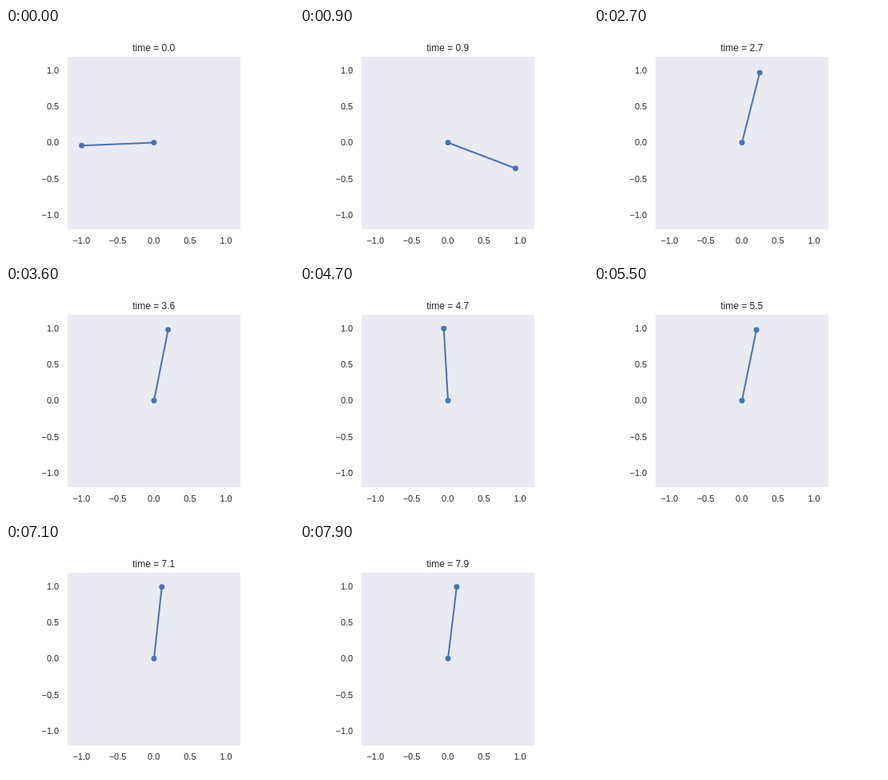
An HTML page for the animation above (8 s loop, 360 px wide and 288 px high).

```html
<!DOCTYPE html>
<html lang="en">
<head>
<meta charset="utf-8">
<title>Pendulum</title>
<style>
  html, body { margin: 0; width: 100%; height: 100%; overflow: hidden; background: #fff; }
  svg { display: block; }
  text { font: 11px "Liberation Sans", Arial, sans-serif; fill: #262626; }
  #title { font-size: 12px; }
</style>
</head>
<body>
<svg id="stage" width="360" height="288" viewBox="0 0 360 288">
  <rect x="77" y="36" width="216" height="216" fill="#eaeaf2"/>
  <text id="title" x="184.7" y="29" text-anchor="middle"></text>
  <g id="labels"></g>
  <line id="rod" x1="185" y1="143.5" stroke="#4c72b0" stroke-width="2"/>
  <circle cx="185" cy="143.5" r="3.45" fill="#4c72b0"/>
  <circle id="bob" r="3.45" fill="#4c72b0"/>
</svg>
<script>
const $ = id => document.getElementById(id);
const CX = 185, CY = 143.5, UNIT = 90.4, LOOP = 8000, STEP = 100;

// Turning points of the balancing phase: [seconds, degrees clockwise from upright]
const turns = [
  [1.8, 17.5], [2.3, 7], [2.7, 14.2], [3.2, 5], [3.85, 14.2], [4.9, -5],
  [5.35, 14.2], [5.85, 1], [6.5, 14.2], [6.9, 2], [7.4, 14.2], [8.1, 5.2]
];

// Free fall from the left, through the bottom
function fall(t) {
  const dt = 0.01;
  let a = 2.4 * Math.PI / 180, v = 0;
  for (let i = Math.round(t / dt); i > 0; i--) {
    const half = v + 10.15 * Math.cos(a) * dt / 2;
    a += half * dt;
    v = half + 10.15 * Math.cos(a) * dt / 2;
  }
  return 270 - 180 - 180 - 2.4 * 0 - a * 180 / Math.PI;
}

// Push up to near upright, slowing to rest
function rise(t) {
  const u = (t - 0.9) / 0.9, w = 1 - u;
  return 110.4 * (1 + 2 * u) * w * w - 144 * u * w * w + 17.5 * u * u * (3 - 2 * u);
}

function balance(t) {
  const i = turns.findIndex(p => p[0] > t);
  const [t0, a0] = turns[i - 1], [t1, a1] = turns[i];
  return a0 + (a1 - a0) * (1 - Math.cos(Math.PI * (t - t0) / (t1 - t0))) / 2;
}

const angle = t => t < 0.95 ? fall(t) : t < 1.75 ? rise(t) : balance(t);

function label(x, y, anchor, value) {
  const el = document.createElementNS("http://www.w3.org/2000/svg", "text");
  el.setAttribute("x", x);
  el.setAttribute("y", y);
  el.setAttribute("text-anchor", anchor);
  el.textContent = value.toFixed(1).replace("-", "\u2212");
  $("labels").append(el);
}

for (const v of [-1, -0.5, 0, 0.5, 1]) {
  label(184.7 + v * UNIT, 270.3, "middle", v);
  label(66.2, 147.3 - v * UNIT, "end", v);
}

function draw(now) {
  const t = Math.floor(now % LOOP / STEP) / 10;
  const a = angle(t) * Math.PI / 180;
  const x = CX + UNIT * Math.sin(a), y = CY - UNIT * Math.cos(a);
  $("title").textContent = "time = " + t.toFixed(1);
  $("rod").setAttribute("x2", x);
  $("rod").setAttribute("y2", y);
  $("bob").setAttribute("cx", x);
  $("bob").setAttribute("cy", y);
}

const start = performance.now();
function tick() {
  draw(performance.now() - start);
  requestAnimationFrame(tick);
}
tick();
</script>
</body>
</html>
```
